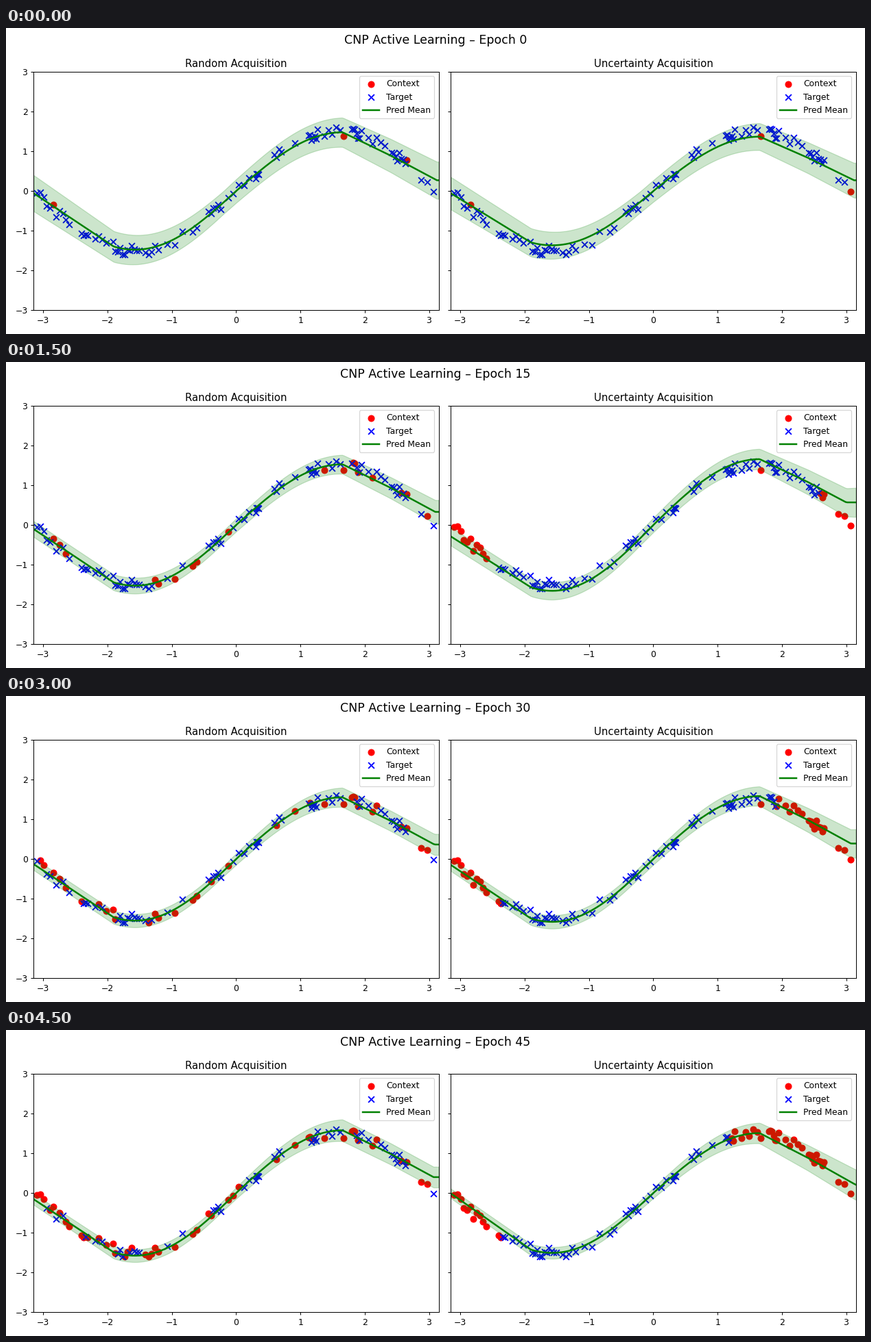
A matplotlib script that plays this animation: 1252x447 px, repeating every 5 s.

```python
import numpy as np
import matplotlib.pyplot as plt
from matplotlib.animation import FuncAnimation

plt.rcParams["font.family"] = "DejaVu Sans"
WIDTH, HEIGHT = 1252, 447
DPI = WIDTH / 14
STEP = 5          # epochs between two frames
FRAMES = 10
TROUGH, CREST, TURN = -1.9, 1.65, 2.4
GRID = np.linspace(-np.pi, np.pi, 240)

# Groups of samples: first x, last x, count.
CLUSTERS = [
    (-3.09, -2.59, 11), (-2.40, -2.30, 4), (-2.19, -2.02, 4), (-1.91, -1.51, 12),
    (-1.41, -1.21, 5), (-1.07, -.84, 3), (-.675, -.615, 2), (-.43, -.24, 6),
    (-.125, .20, 5), (.30, .35, 4), (.59, .70, 4), (.915, 1.125, 2),
    (1.14, 1.265, 7), (1.37, 1.67, 6), (1.79, 1.94, 7), (2.05, 2.30, 5),
    (2.41, 2.65, 9), (2.865, 3.065, 3),
]
rng = np.random.default_rng(7)
X = np.concatenate([np.linspace(*cluster) for cluster in CLUSTERS])
Y = 1.5 * np.sin(X) + rng.uniform(-.14, .14, X.size)


def join_order(start, order):
    """Samples nearest to the start positions come first, then the given order."""
    first = [int(np.abs(X - x).argmin()) for x in start]
    return first + [i for i in order if i not in first]


random_order = join_order((-2.83, 1.67, 2.65), rng.permutation(X.size))
# The far left and the right are the least certain, from the outside in.
uncertainty = np.where(X > -2.35, X, .1 - X)
uncertain_order = join_order((-2.83, 1.67, 3.07), np.argsort(-uncertainty))

# Curve height and right end value at a few epochs; decay and growth of the band.
KEY_EPOCHS = [0, 5, 10, 15, 45]
PANELS = [
    dict(title="Random Acquisition", order=random_order,
         height=[1.48, 1.415, 1.62, 1.53, 1.58], tail=[.27, .30, .33, .33, .40],
         floor=.16, decay=9, growth=0),
    dict(title="Uncertainty Acquisition", order=uncertain_order,
         height=[1.37, 1.54, 1.47, 1.66, 1.51], tail=[.27, .72, .54, .57, .21],
         floor=.13, decay=18, growth=.003),
]


def mean_curve(height, tail):
    """Straight fall, sine rise to the crest, then a slightly bowed descent."""
    start = .15 - .77 * tail
    bend = np.pi - .4 * (tail - .2)
    middle = np.interp(TURN, [CREST, bend], [height, tail]) + .03
    left = np.interp(GRID, [-np.pi, TROUGH], [start, height * np.sin(TROUGH)])
    rise = height * np.sin(np.where(GRID < 0, GRID, GRID * np.pi / 2 / CREST))
    right = np.interp(GRID, [CREST, TURN, bend], [height, middle, tail])
    return np.select([GRID < TROUGH, GRID < CREST], [left, rise], right)


def band_width(epoch, floor, decay, growth):
    base = floor + .21 * np.exp(-epoch / decay)
    knots = [1.5 * base - .1, base, .78 * base,
             base + .0025 * epoch, base + .1 + growth * epoch]
    return np.interp(GRID, [-np.pi, -1.55, -.2, CREST, np.pi], knots)


def draw_panel(ax, epoch, title, order, height, tail, **band):
    ax.clear()
    known = np.isin(np.arange(X.size), order[:3 + epoch])
    mean = mean_curve(*(np.interp(epoch, KEY_EPOCHS, keys) for keys in (height, tail)))
    half = band_width(epoch, **band)
    ax.scatter(X[known], Y[known], c="red", s=50, label="Context")
    ax.scatter(X[~known], Y[~known], c="blue", s=50, marker="x", label="Target")
    ax.plot(GRID, mean, color="green", lw=2, label="Pred Mean")
    ax.fill_between(GRID, mean - half, mean + half, color="green", alpha=.2)
    ax.set_xlim(-np.pi, np.pi)
    ax.set_ylim(-3, 3)
    ax.set_title(title)
    ax.legend(loc="upper right")


# The tiny margin guards against the pixel size rounding down.
fig, axes = plt.subplots(1, 2, dpi=DPI,
                         figsize=((WIDTH + 1e-3) / DPI, (HEIGHT + 1e-3) / DPI))
heading = fig.suptitle("", fontsize=14)


def update(frame):
    epoch = frame * STEP
    heading.set_text(f"CNP Active Learning – Epoch {epoch}")
    for ax, panel in zip(axes, PANELS):
        draw_panel(ax, epoch, **panel)
    axes[1].tick_params(labelleft=False)
    return []


update(0)
fig.tight_layout()
anim = FuncAnimation(fig, update, frames=FRAMES, interval=500, repeat=True, repeat_delay=0)
plt.show()
```
